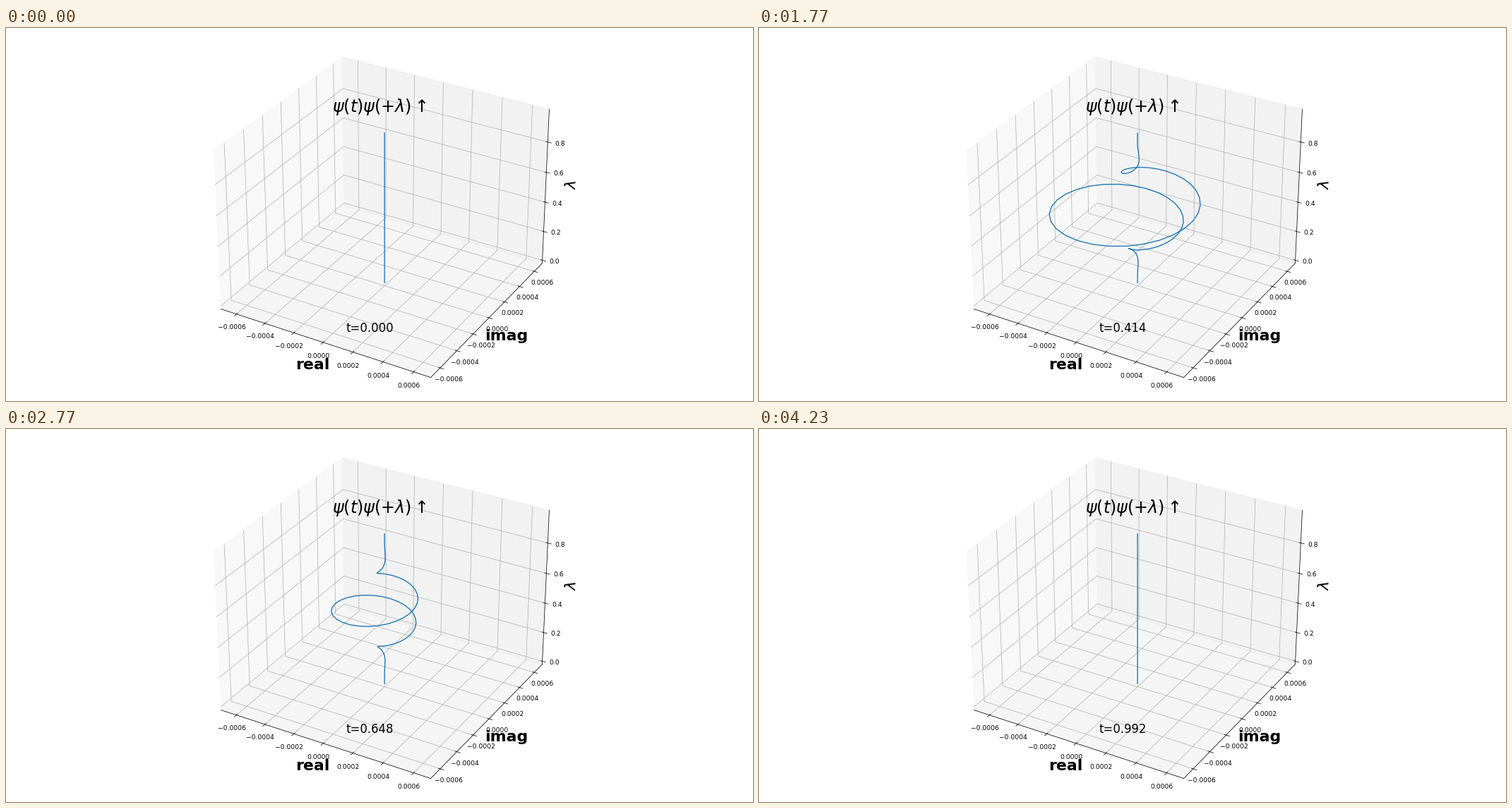
Write a matplotlib script that moves like this. It is 1058 by 529 pixels and loops after 4260 ms.

```python
import numpy as np
import matplotlib.pyplot as plt
from matplotlib.animation import FuncAnimation

W, H, DPI = 1058, 529, 66.125
LOOP_MS = 4260
N = 128        # samples of the wavelet, one animation step per sample
FREQ = 4       # oscillations over the unit interval
CYCLES = 3     # Gaussian width, measured in radians of the carrier

x = np.arange(N) / N
sigma = CYCLES / (2 * np.pi * FREQ)
envelope = np.exp(-0.5 * ((x - 0.5) / sigma) ** 2)
psi = envelope / envelope.sum() * np.exp(2j * np.pi * FREQ * (x - 0.5))
peak = np.abs(psi).max() ** 2


def padded(lo, hi):
    """Widen limits by 1/48 of their range on each side."""
    pad = (hi - lo) / 48
    return lo - pad, hi + pad


def label(px, py, text, size):
    """Left-aligned text with its baseline at a pixel from the lower left."""
    return fig.text(px / W, py / H, text, fontsize=size,
                    ha="left", va="baseline")


fig = plt.figure(figsize=(W / DPI, H / DPI), dpi=DPI, facecolor="white")
ax = fig.add_axes([0, 0, 1, 1], projection="3d")
ax.view_init(elev=30, azim=-60)

ticks = np.arange(-3, 4) * 2e-4
ax.set_xticks(ticks)
ax.set_yticks(ticks)
ax.set_zticks(np.arange(5) * 0.2)
ax.set_xlim(*padded(-peak, peak))
ax.set_ylim(*padded(-peak, peak))
ax.set_zlim(*padded(0, x[-1]))

ax.set_xlabel("real", fontsize=24, fontweight="bold")
ax.set_ylabel("imag", fontsize=24, fontweight="bold")
ax.set_zlabel(r"$\lambda$", fontsize=24)

label(461.5, 410, r"$\psi(t)\psi(+\lambda)\uparrow$", 26)
clock = label(481, 98, "t=0.000", 18)
curve, = ax.plot(np.zeros(N), np.zeros(N), x, color="C0", lw=1.5)


def update(k):
    product = psi[k] * psi
    curve.set_data_3d(product.real, product.imag, x)
    clock.set_text(f"t={x[k]:.3f}")
    return curve, clock


def init():
    return update(0)


anim = FuncAnimation(fig, update, frames=N, init_func=init,
                     interval=LOOP_MS / N, repeat=True, repeat_delay=0,
                     blit=False)
plt.show()
```
